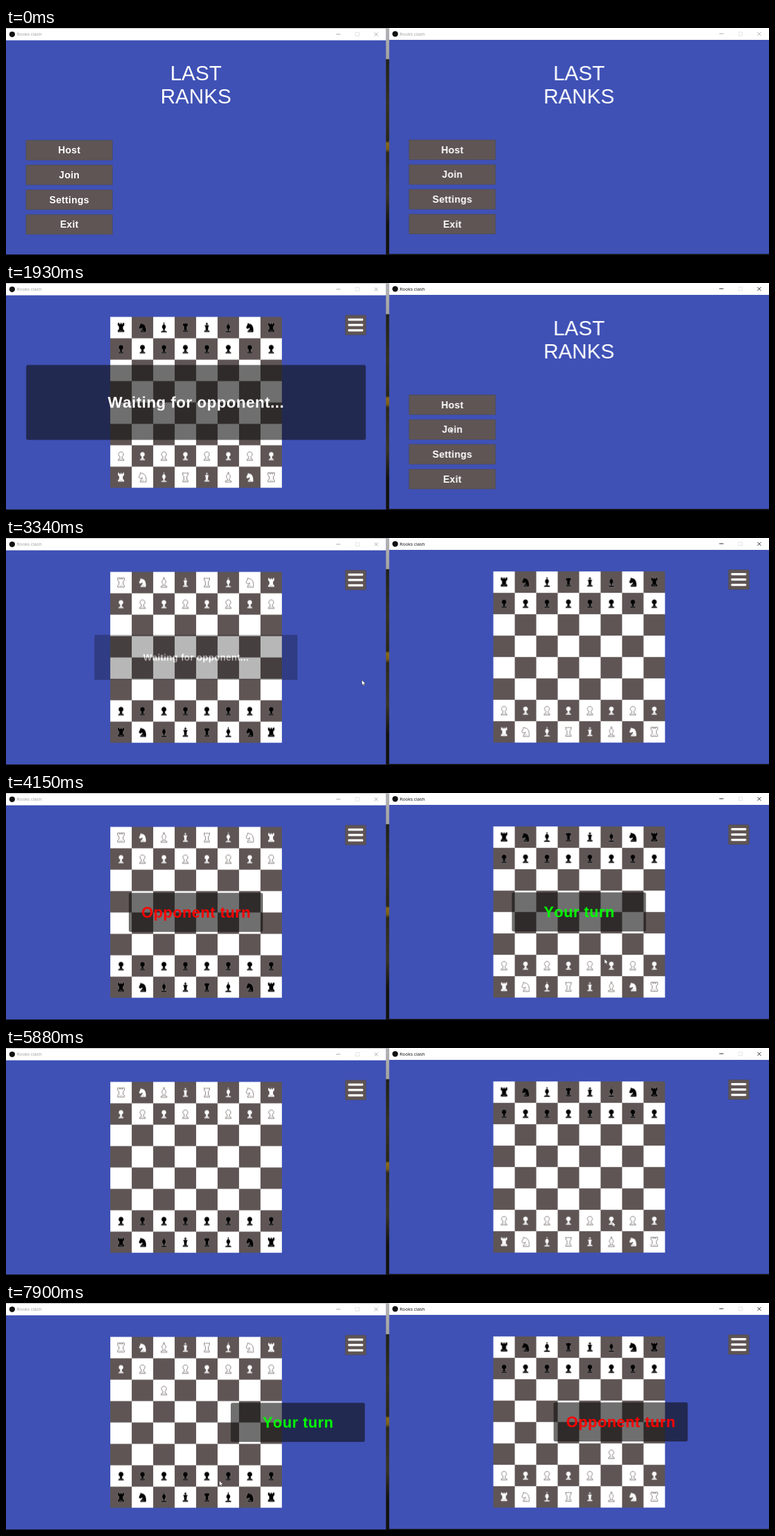
An HTML page for the animation above (8000 ms loop, 1280 by 382 pixels).

```html
<!DOCTYPE html>
<html lang="en">
<head>
<meta charset="utf-8">
<title>Last Ranks</title>
<style>
html, body { margin: 0; width: 100%; height: 100%; overflow: hidden; }
body {
  background:
    linear-gradient(#c4bab6, #c4bab6) 0 0 / 643px 1px no-repeat,
    linear-gradient(#b4b2b0, #a5a3a1 52px, #22221a 53px, #35331f 130px, #2a2819 190px,
      #8a6a18 194px, #7a5f1a 204px, #2c2a1c 210px, #3a3626 280px, #14130f 330px);
}
#stage { display: block; width: 1280px; height: 382px; font-family: "Liberation Sans", Arial, sans-serif; font-kerning: none; }
.mid { text-anchor: middle; }
.bar { color: #9a9a9a; }
.bar text { font: 7.7px "Open Sans", sans-serif; fill: currentColor; }
.home, .dialog { fill: #fff; }
.head { font-size: 34.5px; }
.btn { fill: #5f5554; stroke: #504a57; stroke-width: .8; }
.label { font-size: 16.2px; font-weight: bold; letter-spacing: .35px; }

.black { fill: #000; stroke: #ffffff70; stroke-width: .6; }
.white { fill: #fff; stroke: #5f5554; stroke-width: .8; }
.trim { fill: none; stroke: #999; stroke-width: .7; }
.note { font-weight: bold; }
.note rect { fill: #101010; fill-opacity: .6; }
.wait { fill: #fff; font-size: 26px; letter-spacing: .57px; transform-box: fill-box; transform-origin: center; }
.turn { font-size: 25.3px; letter-spacing: .6px; }
.opp { fill: #f00; }
.you { fill: #0f0; }

/* Motion: one 8 s cycle, 1% = 80 ms */
.bar, .home, .game, .board, .wait, .turn, .turn text, .join, .dialog, .link, .moved, #cursor {
  animation: 8s step-end -12ms infinite;
}
#left .bar { animation-name: focus-left; }
#right .bar { animation-name: focus-right; }
#left .home { animation-name: until-host; }
#left .game { animation-name: from-host; }
#right .home, #left .first { animation-name: until-link; }
#right .game, #left .second { animation-name: from-link; }
#right .join { animation-name: hover-join; }
.dialog { animation-name: dialog; }
.link { animation-name: hover-link; }
.wait { animation-name: shrink; }
#left .turn { animation-name: slide-left; }
#right .turn { animation-name: slide-right; }
.turn .early { animation-name: early; }
.turn .late { animation-name: late; }
.moved { animation-name: advance; }
#cursor { animation-name: cursor; }

@keyframes focus-left { 14% { color: #000; } 24.125% { color: #9a9a9a; } }
@keyframes focus-right { 24.125%, 100% { color: #000; } }
@keyframes until-host { 0% { opacity: 1; } 14%, 100% { opacity: 0; } }
@keyframes from-host { 0% { opacity: 0; } 14%, 100% { opacity: 1; } }
@keyframes until-link { 0% { opacity: 1; } 39.25%, 100% { opacity: 0; } }
@keyframes from-link { 0% { opacity: 0; } 39.25%, 100% { opacity: 1; } }
@keyframes early { 0% { opacity: 1; } 75%, 100% { opacity: 0; } }
@keyframes late { 0% { opacity: 0; } 75%, 100% { opacity: 1; } }
@keyframes hover-join { 22.75% { fill: #8f8a89; } 24.125% { fill: #5f5554; } }
@keyframes dialog { 0% { opacity: 0; } 25.375% { opacity: 1; } 39.25%, 100% { opacity: 0; } }
@keyframes hover-link { 0% { fill: #504a4a; } 34.125%, 100% { fill: #939090; } }
@keyframes shrink {
  0% { transform: none; opacity: 1; }
  39.25% { transform: scale(.92); opacity: .9; }
  40.5% { transform: scale(.76); opacity: .7; }
  41.75% { transform: scale(.598); opacity: .5; }
  43% { transform: scale(.44); opacity: .3; }
  44.25% { transform: scale(.28); opacity: .1; }
  45.5%, 100% { transform: scale(0); opacity: 0; }
}
@keyframes slide-left {
  0% { transform: translateX(-432px); }
  48% { transform: translateX(-399px); }
  49.25% { transform: translateX(-226px); }
  50.625% { transform: translateX(-37px); }
  51.875% { transform: none; }
  64.625% { transform: translateX(60px); }
  65.875% { transform: translateX(233px); }
  67.125% { transform: translateX(407px); }
  68.375% { transform: translateX(432px); }
  82.25% { transform: translateX(-271px); }
  83.5% { transform: translateX(-98px); }
  84.75% { transform: none; }
  98.75%, 100% { transform: translateX(171px); }
}
@keyframes slide-right {
  0% { transform: translateX(-432px); }
  49.25% { transform: translateX(-256px); }
  50.625% { transform: translateX(-65px); }
  51.875% { transform: none; }
  65.875% { transform: translateX(130px); }
  67.125% { transform: translateX(303px); }
  68.375% { transform: translateX(432px); }
  82.25% { transform: translateX(-375px); }
  83.5% { transform: translateX(-202px); }
  84.75% { transform: translateX(-29px); }
  86.125% { transform: none; }
  98.75%, 100% { transform: translateX(70px); }
}
@keyframes advance { 0% { transform: none; } 82.25%, 100% { transform: translateY(var(--dy)); } }
@keyframes cursor {
  0% { transform: translate(900px, 359px); opacity: 0; }
  3.875% { transform: translate(900px, 359px); opacity: 1; animation-timing-function: steps(5); }
  10.125% { transform: translate(94px, 200px); }
  16.5% { transform: translate(94px, 200px); animation-timing-function: steps(5); }
  22.75% { transform: translate(745px, 244px); }
  25.375% { transform: translate(745px, 244px); animation-timing-function: steps(3); }
  29.125% { transform: translate(1000px, 262px); }
  31.625% { transform: translate(1000px, 262px); animation-timing-function: steps(3); }
  35.375% { transform: translate(1042px, 272px); }
  37.875% { transform: translate(1042px, 272px); animation-timing-function: steps(3); }
  41.75% { transform: translate(597px, 239px); }
  45.5% { transform: translate(597px, 239px); animation-timing-function: steps(4); }
  50.625% { transform: translate(985px, 260px); }
  51.875% { transform: translate(1004px, 279px); animation-timing-function: steps(3); }
  55.625% { transform: translate(1012px, 288px); }
  58.25% { transform: translate(1012px, 288px); animation-timing-function: steps(4); }
  63.375% { transform: translate(1020px, 316px); animation-timing-function: steps(4); }
  68.375% { transform: translate(1022px, 330px); animation-timing-function: steps(4); }
  73.5% { transform: translate(1017px, 292px); animation-timing-function: steps(3); }
  77.25% { transform: translate(1010px, 254px); animation-timing-function: steps(2); }
  79.75% { transform: translate(1018px, 263px); }
  82.25% { transform: translate(1018px, 263px); animation-timing-function: steps(3); }
  86.125% { transform: translate(386px, 184px); }
  88.625% { transform: translate(386px, 184px); animation-timing-function: steps(3); }
  92.5% { transform: translate(285px, 240px); animation-timing-function: steps(4); }
  97.5%, 100% { transform: translate(358px, 299px); opacity: 1; }
}
</style>
</head>
<body>
<svg id="stage" viewBox="0 0 1280 382">
  <clipPath id="frame"><rect width="637.4" height="380.2"/></clipPath>
  <g transform="translate(0 .7)"><g id="left" clip-path="url(#frame)"></g></g>
  <g transform="translate(642.6 0)"><g id="right" clip-path="url(#frame)"></g></g>
  <path id="cursor" d="M0 0V8.5L2 6.8L3.4 9.8L4.7 9.2L3.4 6.3H6Z" fill="#fff" stroke="#222" stroke-width=".5"/>
</svg>
<script>
const CELL = 36;
const shapes = {
  P: 'M-5 7.5Q-5 5-2.5 4.5L-1.5 1.2A4.2 4.2 0 1 1 1.5 1.2L2.5 4.5Q5 5 5 7.5Z',
  R: 'M-5.5-8h3v2h1.5v-2h2v2h1.5v-2h3v4.5l-2 1.5v5l2 1.5v3h-11v-3l2-1.5v-5l-2-1.5z',
  N: 'M-4 7.8C-4 4 .5 3 0 .5L-4 2.2L-6.3 0L-4-5L-3.2-8L-1-6.5C4.5-6.5 7 0 6 7.8Z',
  B: 'M-5 8V6.3L-1.5 5.2V2.2C-4.5 0-3.5-4 0-6.3C3.5-4 4.5 0 1.5 2.2V5.2L5 6.3V8ZM0-8.6a1.2 1.2 0 1 0 .01 0z',
  Q: 'M-4.5 7.5V5.5L-2.5 4V-2L-4.5-4V-8L-2-6.5L0-8L2-6.5L4.5-8V-4L2.5-2V4L4.5 5.5V7.5Z',
  K: 'M-4.5 7.5V5.5L-2 4L-2.5-1L-4-4H-.8V-5.5H-2.2V-7H-.8V-8.5H.8V-7H2.2V-5.5H.8V-4H4L2.5-1L2 4L4.5 5.5V7.5Z'
};

function piece(kind, side, col, row, dy) {
  const move = dy ? `class="moved" style="--dy:${dy}px"` : '';
  return `<g transform="translate(${(col + .5) * CELL} ${(row + .5) * CELL})"><g ${move}>
    <path class="${side}" d="${shapes[kind]}"/><path class="trim" d="M-3 5.2h6"/></g></g>`;
}

// A flipped board is seen from the black side.
function board(flipped, cls = '') {
  const back = flipped ? 'RNBKQBNR' : 'RNBQKBNR';
  const [top, bottom] = flipped ? ['white', 'black'] : ['black', 'white'];
  let dark = '', men = '';
  for (let c = 0; c < 8; c++) {
    for (let r = (c + 1) % 2; r < 8; r += 2) dark += `M${c * CELL} ${r * CELL}h${CELL}v${CELL}h-${CELL}z`;
    men += piece(back[c], top, c, 0)
      + piece('P', top, c, 1, flipped && c === 2 ? CELL : 0)
      + piece('P', bottom, c, 6, !flipped && c === 5 ? -CELL : 0)
      + piece(back[c], bottom, c, 7);
  }
  return `<g transform="translate(174.9 56.3)"><g class="board ${cls}">
    <rect width="288" height="288" fill="#fff"/><path d="${dark}" fill="#5f5554"/>${men}</g></g>`;
}

const bar = `<rect width="638" height="381" fill="#3f51b5"/><g class="bar">
  <rect width="638" height="20" fill="#fff"/><circle cx="10.3" cy="10" r="4.8" fill="#111"/>
  <text x="18" y="12.8">Rooks clash</text>
  <g fill="none" stroke="currentColor" stroke-width=".9">
    <path d="M554 9.7h7M618 6.9l6 6m0-6l-6 6"/><path d="M586.5 6.9h6v6h-6z" stroke="#ddd"/></g></g>`;

const button = (name, i) => {
  const y = 187.9 + i * 41.7;
  return `<rect class="btn ${name.toLowerCase()}" x="33.7" y="${y + .4}" width="144.8" height="33.2"/>
    <text class="label mid" x="106.2" y="${y + 22.7}">${name}</text>`;
};

const home = extra => `<g class="home">
  <g class="head mid"><text x="318.6" y="87.6">LAST</text><text x="318.6" y="126.8">RANKS</text></g>
  ${['Host', 'Join', 'Settings', 'Exit'].map(button).join('')}${extra}</g>`;

const labels = { opp: 'Opponent turn', you: 'Your turn' };
const turnText = (when, who) => `<text class="${when} ${who} mid" x="319" y="209.3">${labels[who]}</text>`;

const game = (content, early, late) => `<g class="game">${content}
  <rect class="btn" x="569.3" y="53.6" width="34.6" height="33" rx="1.5"/>
  <path d="M575.5 60.8h22M575.5 69.8h22M575.5 78.8h22" stroke="#fff" stroke-width="3.8" stroke-linecap="round"/>
  <g class="note turn"><rect x="206" y="167.3" width="225" height="65.7" rx="3"/>
  ${turnText('early', early)}${turnText('late', late)}</g></g>`;

const dialog = `<g transform="translate(212.4 198.8)"><g class="dialog">
  <rect width="213" height="87" rx="4" fill="#403b43"/>
  <rect x="3.5" y="3.5" width="206.5" height="80" rx="4" fill="#925753"/>
  <text x="8" y="17.7" font-size="9.5" font-weight="bold" letter-spacing=".2">Connect to host</text>
  <text x="17" y="43" font-size="8">Host IP :</text>
  <rect x="73" y="34" width="131" height="12.5" rx="1.5"/>
  <text x="76" y="43.2" font-size="8.2" fill="#999">localhost</text>
  <g class="mid" font-size="5.8" font-weight="bold">
    <rect x="18.5" y="66" width="46.5" height="12" rx="1" fill="#504a4a"/><text x="41.5" y="74.2">Cancel</text>
    <rect class="link" x="148.5" y="66" width="46" height="12" rx="1"/><text x="171.5" y="74.2">Connect</text>
  </g></g></g>`;

const wait = `<g class="note wait"><rect x="33.8" y="137.3" width="569.8" height="125.9" rx="3"/>
  <text class="mid" x="318.8" y="209.3">Waiting for opponent...</text></g>`;

document.getElementById('left').innerHTML =
  bar + home('') + game(board(false, 'first') + board(true, 'second') + wait, 'opp', 'you');
document.getElementById('right').innerHTML =
  bar + home(dialog) + game(board(false), 'you', 'opp');
</script>
</body>
</html>
```
